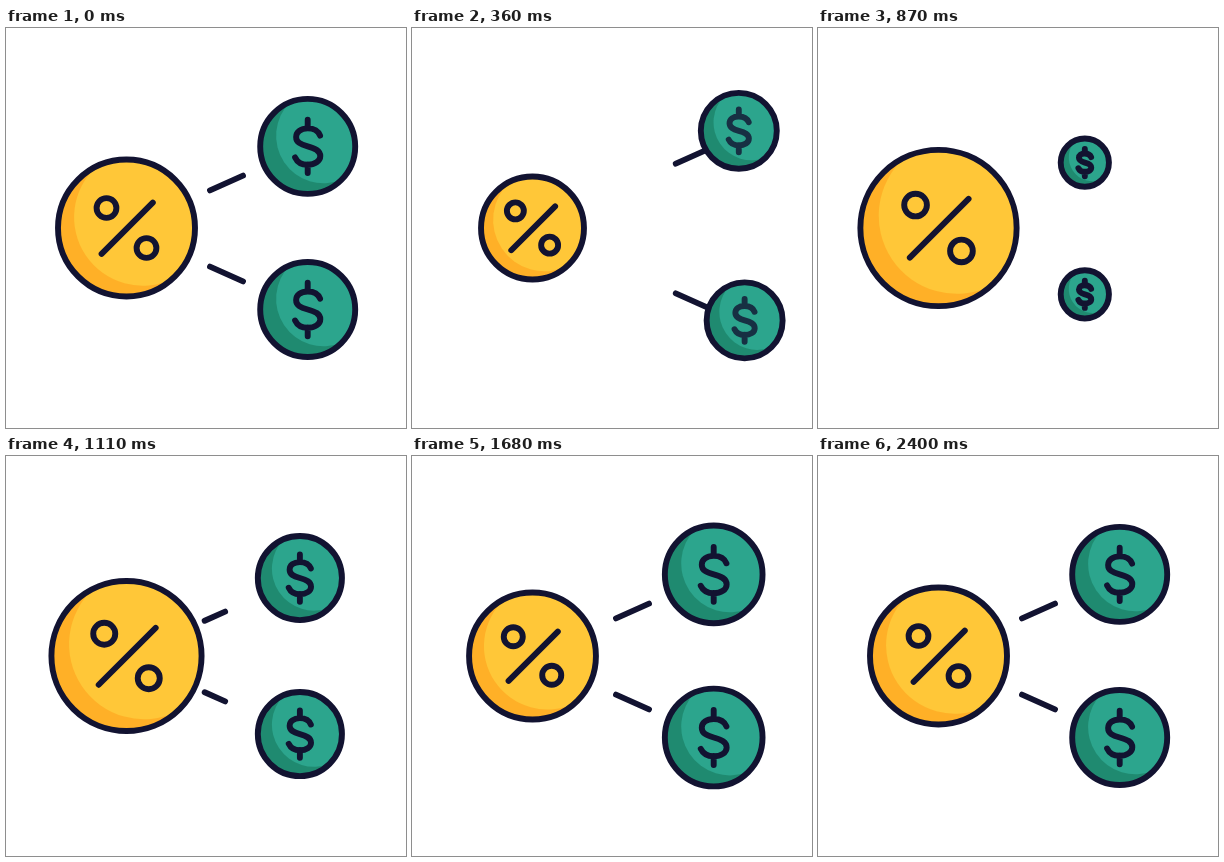
An HTML page for the animation above (4430 ms loop, 400 by 400 pixels).

```html
<!DOCTYPE html>
<html lang="en">
<head>
<meta charset="utf-8">
<title>Percent and dollar coins</title>
<style>
html, body { margin: 0; width: 100%; height: 100%; overflow: hidden; background: #fff; }
svg { display: block; width: 100%; height: 100%; }
</style>
</head>
<body>
<svg id="stage" viewBox="0 0 400 400" fill="none" stroke="#121331" stroke-width="5.9" stroke-linecap="round" stroke-linejoin="round"></svg>
<script>
const LOOP = 4430, STEP = 30, END = 2400;
const stage = document.getElementById("stage");

function add(tag, attrs, parent = stage) {
  const el = document.createElementNS("http://www.w3.org/2000/svg", tag);
  set(el, attrs);
  parent.appendChild(el);
  return el;
}
function set(el, attrs) {
  for (const k in attrs) el.setAttribute(k, attrs[k]);
}

const clamp = u => Math.max(0, Math.min(1, u));
const span = (t, a, b) => clamp((t - a) / (b - a));
const smooth = u => u * u * (3 - 2 * u);
const easeOut = (u, n) => 1 - Math.pow(1 - u, n);
const mix = (a, b, u) => a + (b - a) * u;

// Eased value through [time, value] keys
function track(keys, t) {
  for (let i = 1; i < keys.length; i++) {
    const [t0, v0] = keys[i - 1], [t1, v1] = keys[i];
    if (t <= t1) return mix(v0, v1, smooth(span(t, t0, t1)));
  }
  return keys[keys.length - 1][1];
}

function makeCoin(light, dark, shift) {
  const g = add("g", {});
  return {
    g,
    shift,
    base: add("circle", { fill: dark, stroke: "none" }, g),
    shine: add("path", { fill: light, stroke: "none" }, g),
    rim: add("circle", {}, g),
    sign: add("path", {}, g)
  };
}

// Overlap of the disc with a copy of itself moved up and right
function lens(x, y, r, shift) {
  const ox = shift * r, oy = -0.67 * ox, d = Math.hypot(ox, oy);
  const h = Math.sqrt(r * r - d * d / 4) / d;
  const mx = x + ox / 2, my = y + oy / 2, px = -oy * h, py = ox * h;
  return `M${mx - px} ${my - py}A${r} ${r} 0 0 1 ${mx + px} ${my + py}` +
         `A${r} ${r} 0 0 1 ${mx - px} ${my - py}Z`;
}

function drawCoin(coin, x, y, r, sign) {
  coin.g.style.display = r > 0.5 ? "" : "none";
  if (r <= 0.5) return;
  set(coin.base, { cx: x, cy: y, r });
  set(coin.rim, { cx: x, cy: y, r });
  set(coin.shine, { d: lens(x, y, r, coin.shift) });
  set(coin.sign, { d: sign, transform: `translate(${x} ${y})` });
}

// Scales path numbers only, so the line weight stays the same
const scalePath = (d, s) => d.replace(/-?\d+(\.\d+)?/g, n => (n * s).toFixed(2));

const DOLLAR = "M0 -26.7 L0 -18 M0 18 L0 26.7 " +
  "M12.4 -10.8 C10.5 -15.5 6 -18 0 -18 C-7 -18 -11.6 -14.5 -11.6 -9.5 " +
  "C-11.6 -4 -7 -2 0 0 C7.5 2 12.6 4.2 12.6 9.7 " +
  "C12.6 14.8 7 18.3 0 18.3 C-5.5 18.3 -10.3 16 -12.6 11";

function percent(s) {
  const r = 9.9 * s, c = 20 * s, l = 25.6 * s;
  const ring = (x, y) => `M${x - r} ${y}a${r} ${r} 0 1 1 ${2 * r} 0a${r} ${r} 0 1 1 ${-2 * r} 0Z`;
  return ring(-c, -c) + ring(c, c) + `M${0.7 - l} ${l + 0.3}L${l + 0.7} ${0.3 - l}`;
}

const HOME_X = 301.7;
const sides = [
  { dir: -1, y: 118.4, outY: -58, pow: 3.4, slope: 0.465 },
  { dir: 1, y: 281.5, outY: 33, pow: 2.86, slope: 0.435 }
];
sides.forEach(s => s.line = add("line", {}));
sides.forEach(s => s.coin = makeCoin("#2ca58d", "#1f8a70", 0.335));
const gold = makeCoin("#ffc738", "#ffb027", 0.235);

const GOLD_R = [[0, 68.5], [450, 49.5], [960, 80.7], [1430, 57.3], [1900, 68.5]];
const GOLD_SIGN = [[0, 1], [450, 0.84], [960, 1.175], [1430, 0.915], [1900, 1]];
const GREEN_R = [[1450, 58.2], [1910, 39.5], [END, 47.5]];
const LEAVE = 530, ENTER = 600, PEAK = 1450, DRAW = 880;

function greenPose(s, t) {
  if (t < ENTER) {
    const u = span(t, 0, LEAVE), move = Math.pow(u, s.pow);
    const left = 1 - Math.pow(u, 4.16);
    return { x: HOME_X + 93.5 * move, y: s.y + s.outY * move, r: 47.5 * left, fade: left };
  }
  const u = span(t, ENTER, PEAK), x = mix(200, HOME_X, easeOut(u, 2.8));
  return {
    x,
    y: s.y + s.dir * (x - HOME_X) * s.slope,
    r: t < PEAK ? 58.2 * easeOut(u, 1.4) : track(GREEN_R, t),
    fade: 1
  };
}

function drawLine(s, t, pose) {
  let a, b, shown;
  if (t < ENTER) {
    a = 204 + 166 * Math.pow(span(t, 0, LEAVE), 2.64);
    b = Math.min(a + 33, pose.x);
    shown = pose.r > 4 && a < b;
  } else {
    const u = easeOut(span(t, DRAW, 1550), 2.3);
    a = mix(190, 204, u);
    b = mix(190, 237, u);
    shown = t > DRAW;
  }
  const rayY = x => 200.5 + s.dir * (38.1 + 0.447 * (x - 204));
  s.line.style.display = shown ? "" : "none";
  set(s.line, { x1: a, y1: rayY(a), x2: b, y2: rayY(b) });
}

function draw(time) {
  const t = Math.min(END, Math.floor((time % LOOP) / STEP) * STEP);
  for (const s of sides) {
    const p = greenPose(s, t);
    drawLine(s, t, p);
    drawCoin(s.coin, p.x, p.y, p.r, scalePath(DOLLAR, p.r / 47.5));
    set(s.coin.sign, { opacity: p.fade });
  }
  drawCoin(gold, 120.5, 200, track(GOLD_R, t), percent(track(GOLD_SIGN, t)));
}

let start = null;
function tick(now) {
  if (start === null) start = now;
  draw(now - start);
  requestAnimationFrame(tick);
}
draw(0);
requestAnimationFrame(tick);
</script>
</body>
</html>
```
